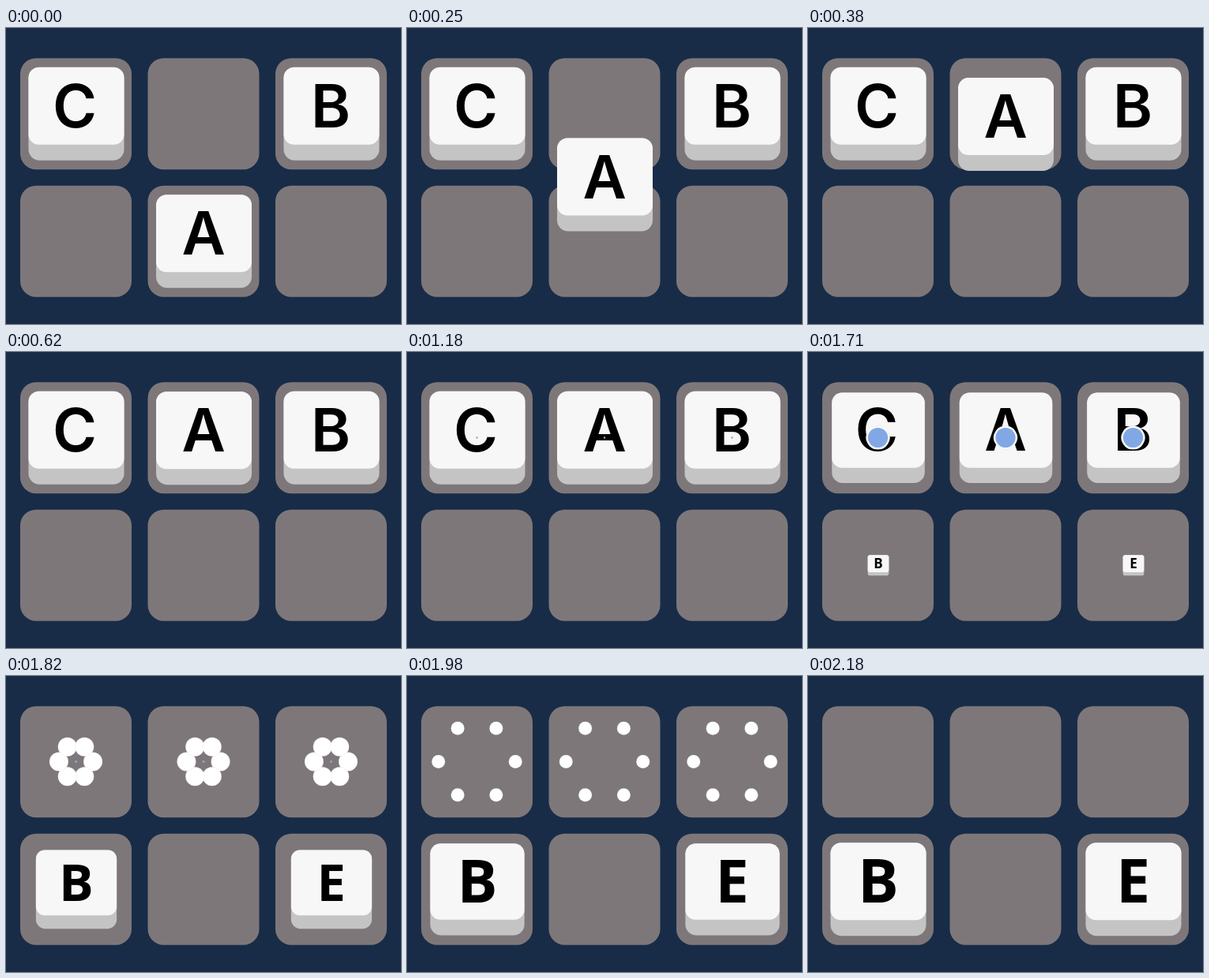
An HTML page with a canvas that plays this animation: 500 px wide and 375 px high, repeating every 2.72 s.

```html
<!DOCTYPE html>
<html lang="en">
<head>
<meta charset="utf-8">
<title>Letter keys</title>
<style>
  html, body { margin: 0; width: 100%; height: 100%; overflow: hidden; background: #182c47; }
  canvas { display: block; width: 500px; height: 375px; }
</style>
</head>
<body>
<canvas></canvas>
<script>
const LOOP = 2720, PITCH = 161.5, CENTER_X = 88.5, CENTER_Y = 108.5;
const SLIDE_START = 211, DOT_START = 1176, BURST_START = 1694;
const ROUNDED = '600 76px Inter, sans-serif';
const HUMANIST = '700 77px "Open Sans", sans-serif';

const canvas = document.querySelector('canvas');
const ratio = window.devicePixelRatio || 1;
canvas.width = 500 * ratio;
canvas.height = 375 * ratio;
const ctx = canvas.getContext('2d');

const lerp = (a, b, p) => a + (b - a) * p;
const clamp = v => Math.min(1, Math.max(0, v));

// Exponential ease-out, 0 before its start.
function settle(time, start) {
  const p = clamp((time - start) / 472);
  return p === 1 ? 1 : 1 - 2 ** (-10 * p);
}

function box(x, y, w, h, r, color) {
  ctx.fillStyle = color;
  ctx.beginPath();
  ctx.roundRect(x, y, w, h, r);
  ctx.fill();
}

function disc(x, y, r, color) {
  if (r <= 0) return;
  ctx.fillStyle = color;
  ctx.beginPath();
  ctx.arc(x, y, r, 0, 2 * Math.PI);
  ctx.fill();
}

// The letter's ink is centred on the key, shifted by nudge.
function drawKey(letter, font, column, row, scale = 1, nudge = 0) {
  if (scale <= 0) return;
  ctx.save();
  ctx.translate(CENTER_X + 0.5 + column * PITCH, CENTER_Y + 0.3 + row * PITCH);
  ctx.scale(scale, scale);
  box(-60.5, -59, 121, 118, 14, '#c4c4c4');
  box(-60.5, -59, 121, 98, 13, '#f7f7f7');
  ctx.font = font;
  ctx.fillStyle = '#000';
  const ink = ctx.measureText(letter);
  const middle = (ink.actualBoundingBoxRight - ink.actualBoundingBoxLeft) / 2;
  ctx.fillText(letter, nudge - middle, 17);
  ctx.restore();
}

function drawPetals(x, time) {
  const p = (time - BURST_START) / 424;
  if (p < 0 || p >= 1) return;
  const distance = 72 * p, radius = 12.3 * (1 - p ** 3);
  ctx.strokeStyle = 'rgba(126, 119, 122, 0.2)';
  ctx.lineWidth = 0.5;
  for (let i = 0; i < 6; i++) {
    const angle = i * Math.PI / 3;
    disc(x + distance * Math.cos(angle), CENTER_Y + distance * Math.sin(angle), radius, '#fff');
    ctx.stroke();
  }
}

function draw(time) {
  ctx.setTransform(ratio, 0, 0, ratio, 0, 0);
  ctx.fillStyle = '#182c47';
  ctx.fillRect(0, 0, 500, 375);
  for (let i = 0; i < 6; i++) {
    box(18 + (i % 3) * PITCH, 38.2 + Math.floor(i / 3) * PITCH, 141, 141, 20, '#7e777a');
  }

  const burst = settle(time, BURST_START);
  const shrink = 1 - clamp((time - BURST_START) / 100) ** 2;
  drawKey('C', ROUNDED, 0, 0, shrink, -2);
  drawKey('B', ROUNDED, 2, 0, shrink);
  drawKey('A', ROUNDED, 1, 1 - settle(time, SLIDE_START), shrink, -0.5);
  drawKey('B', HUMANIST, 0, 1, burst, 1);
  drawKey('E', HUMANIST, 2, 1, burst, 0.5);

  const dotRadius = lerp(16.5 * settle(time, DOT_START), -1.3, burst);
  for (let column = 0; column < 3; column++) {
    const x = CENTER_X + column * PITCH;
    drawPetals(x, time);
    disc(x, CENTER_Y, dotRadius, '#81a8e4');
  }
}

const begin = performance.now();
function tick() {
  draw((performance.now() - begin) % LOOP);
  requestAnimationFrame(tick);
}
tick();
</script>
</body>
</html>
```
